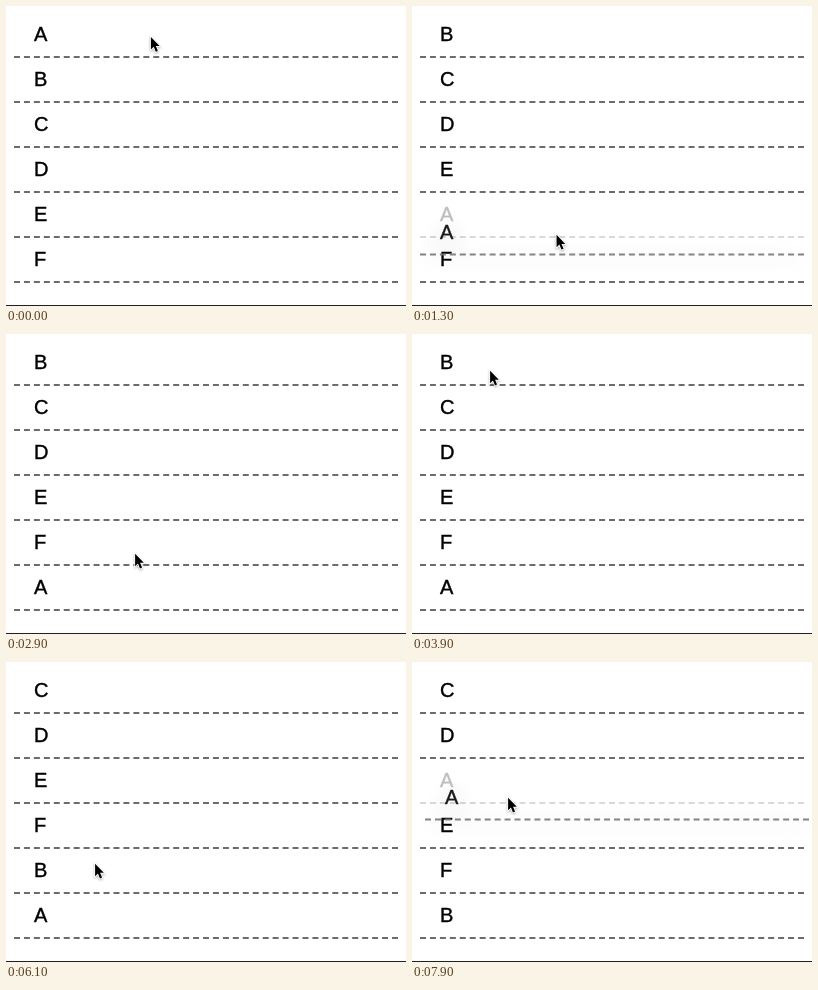
Write an HTML page that moves like this. It is 400 px wide and 300 px high and loops after 8000 ms.

```html
<!DOCTYPE html>
<html lang="en">
<head>
<meta charset="utf-8">
<title>Drag to reorder</title>
<style>
html, body { margin: 0; width: 100%; height: 100%; overflow: hidden; background: #fff; }
body { position: relative; }
.row {
  position: absolute; left: 8px; top: 7px; box-sizing: border-box;
  width: 384px; height: 45px; padding-left: 20px;
  border-bottom: 2px dashed #6c6c6c;
  font: 20px/42px "Liberation Sans", Arial, sans-serif; color: #000;
  -webkit-text-stroke: .4px;
}
.row.held { opacity: .25; }
#ghost { opacity: .9; border-color: #777; filter: drop-shadow(0 3px 12px rgba(0, 0, 0, .35)); }
#floor { position: absolute; left: 0; top: 299px; width: 100%; height: 1px; background: #222; }
#cursor { position: absolute; left: 0; top: 0; overflow: visible; filter: drop-shadow(0 1px 1px rgba(0, 0, 0, .3)); }
</style>
</head>
<body>
<div id="floor"></div>
<div id="ghost" class="row"></div>
<svg id="cursor" width="12" height="18">
  <path transform="translate(.6 .3) scale(.92)" d="M0 0V13.5L3.1 10.6 5.3 16 7.6 15 5.4 9.8H9.5Z"
    stroke="#fff" stroke-width="1.8" paint-order="stroke"/>
</svg>
<script>
const LOOP = 8000, STEP = 100, TOP = 7, ROW = 45;
const LETTERS = [...'ABCDEF'];

// Pointer moves: each leg runs to a point, slowing down by a power
const HOME = [144.3, 30.8];
const LEGS = [
  { from: 0, to: 900, x: 140, y: 170, power: 1 },
  { from: 900, to: 1600, x: 145, y: 244, power: 1.85 },
  { from: 1700, to: 2300, x: 157, y: 243, power: 1 },
  { from: 2600, to: 2900, x: 128.5, y: 219.5, power: 1 },
  { from: 2900, to: 3900, x: 77.5, y: 36.5, power: 1.2 },
  { from: 4200, to: 5300, x: 80, y: 199.5, power: 1.15 },
  { from: 5400, to: 6100, x: 88.5, y: 201.5, power: 1 },
  { from: 6200, to: 6900, x: 90.5, y: 254, power: 1 },
  { from: 7300, to: 7900, x: 95.5, y: 135.5, power: 1 }
];

// After the drop the ghost slides back to where it was picked up
const DRAGS = [
  { letter: 'A', start: 0, drop: 1700, end: 2300 },
  { letter: 'B', start: 4200, drop: 5400, end: 6100 },
  { letter: 'A', start: 7300, drop: LOOP, end: LOOP }
];

const ghost = document.getElementById('ghost');
const cursor = document.getElementById('cursor');
const rows = Object.fromEntries(LETTERS.map(letter => {
  const row = document.createElement('div');
  row.className = 'row';
  row.textContent = letter;
  document.body.insertBefore(row, ghost);
  return [letter, row];
}));

const slotAt = y => Math.floor((y - TOP) / ROW);
const easeInOut = u => u < .5 ? 4 * u ** 3 : 1 - 4 * (1 - u) ** 3;
const move = (el, x, y) => el.style.transform = `translate(${x}px, ${y}px)`;

function pointer(t) {
  let [x, y] = HOME;
  for (const leg of LEGS) {
    if (t <= leg.from) break;
    const u = Math.min(1, (t - leg.from) / (leg.to - leg.from));
    const k = 1 - (1 - u) ** leg.power;
    x += (leg.x - x) * k;
    y += (leg.y - y) * k;
  }
  return [x, y];
}

function draw(t) {
  let order = LETTERS, active, home;
  for (const drag of DRAGS) {
    if (t <= drag.start) break;
    const { letter, drop, end } = drag;
    home = order.indexOf(letter);
    order = order.filter(other => other !== letter);
    order.splice(slotAt(pointer(Math.min(t, drop))[1]), 0, letter);
    active = t < end ? drag : null;
  }
  order.forEach((letter, i) => {
    move(rows[letter], 0, i * ROW);
    rows[letter].classList.toggle('held', active?.letter === letter);
  });

  ghost.style.display = active ? '' : 'none';
  if (active) {
    const { letter, start, drop, end } = active;
    const away = t > drop ? 1 - easeInOut((t - drop) / (end - drop)) : 1;
    const [x0, y0] = pointer(start);
    const [x, y] = pointer(Math.min(t, drop));
    ghost.textContent = letter;
    // The half pixel softens the ghost's line
    move(ghost, Math.round((x - x0) * away), home * ROW + Math.floor((y - y0) * away) + .5);
  }
  move(cursor, ...pointer(t));
}

function frame() {
  draw(Math.floor(performance.now() % LOOP / STEP) * STEP);
  requestAnimationFrame(frame);
}
frame();
</script>
</body>
</html>
```
